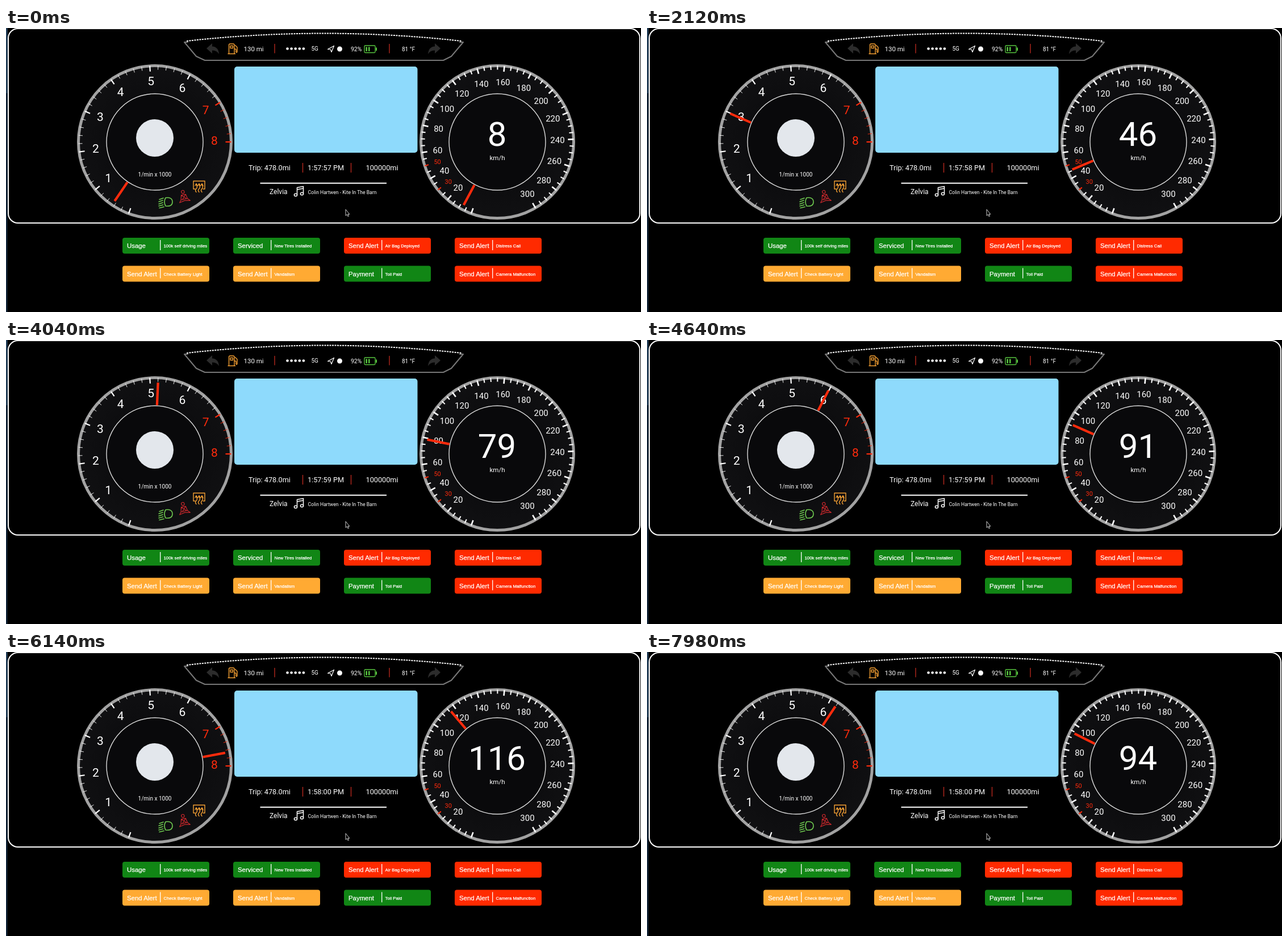
Recreate the animation shown at these times as an HTML page. Size 1118x501 px, loop 8000 ms.

```html
<!DOCTYPE html>
<html lang="en">
<head>
<meta charset="utf-8">
<title>Dashboard</title>
<style>
html, body { margin: 0; width: 100%; height: 100%; overflow: hidden; background: #000; }
svg { display: block; width: 1118px; height: 501px; font-family: Roboto, Arial, sans-serif; }
.line { fill: none; stroke-linecap: round; stroke-linejoin: round; }
.button { font-family: "Liberation Sans", Arial, sans-serif; }
.button text { stroke: #fff; stroke-width: .25px; }
</style>
</head>
<body>
<svg id="stage" viewBox="0 0 1118 501">
  <defs>
    <radialGradient id="face">
      <stop offset="0" stop-color="#08080a"/>
      <stop offset="1" stop-color="#101012"/>
    </radialGradient>
  </defs>
  <rect width="2.5" height="501" fill="#14263a"/>
  <rect width="2.5" height="115" fill="#26425c"/>
  <rect x="4" y="1" width="1112" height="343" rx="17" fill="#000" stroke="#fff" stroke-width="2"/>

  <!-- status bar -->
  <path class="line" d="M320 25H314L335 50 350 57H770L784 50 805 25H799" stroke="#777" stroke-width="2"/>
  <path d="M318 23Q560-4 802 23" fill="none" stroke="#fff" stroke-width="2" stroke-dasharray="3 1.5"/>
  <path id="turn" d="M353 36 363 27V32.5Q374 33 375 46 371 39 363 39.5V45Z" fill="#2c2c2c"/>
  <use href="#turn" transform="matrix(-1 0 0 1 1118 0)"/>
  <path class="line" d="M392.5 45.5V30Q392.5 28 394.500 28H400Q402 28 402 30V45.5M391 45.5H403.5M395 31.5H399.5V35.5H395ZM402 37H403.5Q405 37 405 39V42.5Q406.5 44 407 42V34L403.5 30.5" stroke="#f5a033" stroke-width="1.4"/>
  <path class="line" d="M566.5 37.5 577.5 31.5 573 42.5 571.5 38Z" stroke="#fff" stroke-width="1.2"/>
  <circle cx="587.5" cy="37" r="4.5" fill="#fff"/>
  <g fill="#58c840">
    <rect x="631" y="31" width="19" height="12.5" rx="1.5" fill="none" stroke="#58c840" stroke-width="1.3"/>
    <path d="M651 34.5H653V40H651ZM633.5 33.5H636V41H633.5ZM638 33.5H640.5V41H638Z"/>
  </g>

  <!-- centre -->
  <rect x="402" y="68" width="322.5" height="152" rx="5" fill="#8edafc"/>
  <path d="M447.5 273.7H670" stroke="#fff" stroke-width="2"/>
  <g class="line" stroke="#fff" stroke-width="1.5">
    <path d="M512.5 294V281.5L523.5 279.5V292M512.5 285 523.5 283"/>
    <ellipse cx="510" cy="294.5" rx="2.6" ry="2.2"/>
    <ellipse cx="521" cy="292.5" rx="2.6" ry="2.2"/>
  </g>

  <g id="parts"></g>

  <!-- warning lights -->
  <path class="line" d="M281 299.5Q293 298 293 307 293 315.5 281 314 277 307 281 299.5ZM270 302.5 277 300M269 306.5 276 304M269 310.5 276 308M269 314 276.5 312M270 317.5 278 315.5" stroke="#6fcb50" stroke-width="1.6"/>
  <g class="line" stroke="#c9282c" stroke-width="1.2" transform="rotate(-12 313 297)">
    <circle cx="313" cy="289" r="2.7"/>
    <path d="M309 294H317L318.500 302H307ZM309 294 317 302M317 294 309 302.5M307 302 303.500 306.5 313 304.500 322.5 306.500 318.500 302"/>
  </g>
  <g class="line" stroke="#f5a033" stroke-width="1.4">
    <path d="M333 284H330V270H350V284H347"/>
    <path id="heat" d="M335 289.5Q332 286.5 335 283.5T335 276.5M333 278 335 274.5 337 278"/>
    <use href="#heat" x="5"/>
    <use href="#heat" x="10"/>
  </g>

  <circle cx="262" cy="194" r="33" fill="#e3e7ec"/>
  <path d="M598 320V331L600.3 329 602 332.5 603.6 331.7 602 328.5H604.8Z" fill="#000" stroke="#ddd" stroke-width=".9"/>
</svg>
<script>
const RED = '#ff2b0c', NS = 'http://www.w3.org/2000/svg';
const parts = document.getElementById('parts');

function add(tag, attrs, parent = parts) {
  const el = document.createElementNS(NS, tag);
  for (const k in attrs) el.setAttribute(k, attrs[k]);
  return parent.appendChild(el);
}

// y is the middle of the capital letters
function text(x, y, str, size, anchor = 'start', fill = '#fff', parent = parts) {
  const el = add('text', {x, y: y + size * .356, 'font-size': size, 'text-anchor': anchor, fill}, parent);
  el.textContent = str;
  return el;
}

function line(x1, y1, x2, y2, stroke, width) {
  return add('line', {x1, y1, x2, y2, stroke, 'stroke-width': width});
}

// angles run clockwise from straight down
function polar(cx, r, deg) {
  const a = deg * Math.PI / 180;
  return [cx - r * Math.sin(a), 201 + r * Math.cos(a)];
}

function tick(cx, deg, length, width, color) {
  line(...polar(cx, 134.5, deg), ...polar(cx, 134.5 - length, deg), color, width);
}

function dialFace(cx) {
  add('circle', {cx, cy: 201, r: 134.5, fill: 'url(#face)', stroke: '#a2a2a2', 'stroke-width': 5});
  add('circle', {cx, cy: 201, r: 85, fill: '#09090b', stroke: '#ddd', 'stroke-width': 1.4});
}

function needle(cx) {
  return line(cx, 287, cx, 327, RED, 4.2);
}

const REV = 262, SPEED = 865;
const revAngle = n => 20 + 31.25 * n;
const speedAngle = v => 20 + v * 31 / 30;

dialFace(REV);
for (let i = 0; i <= 40; i++) {
  const major = i % 5 === 0;
  tick(REV, revAngle(i / 5), major ? 10 : 7, major ? 2.2 : .9, i >= 35 ? RED : '#fff');
}
for (let n = 1; n <= 8; n++) {
  const [x, y] = polar(REV, 105, revAngle(n));
  text(x, y - 2.5, n, 21, 'middle', n > 6 ? RED : '#fff');
}
text(REV, 258, '1/min x 1000', 10, 'middle');

dialFace(SPEED);
for (let v = 0; v <= 300; v += 5) {
  const major = v % 20 === 0, limit = v === 30 || v === 50;
  tick(SPEED, speedAngle(v), major ? 10 : 7, major ? 2.6 : 2, limit ? RED : '#fff');
  if (!limit && (!major || !v)) continue;
  const [x, y] = polar(SPEED, limit ? 111 : 106, speedAngle(v));
  text(x, y, v, limit ? 11 : 15, 'middle', limit ? RED : '#fff');
}
text(SPEED, 229, 'km/h', 11.5, 'middle');
const speedText = text(SPEED - .5, 187, '', 60, 'middle');
const revNeedle = needle(REV), speedNeedle = needle(SPEED);

text(418.5, 37, '130 mi', 11.5);
text(537.5, 36.5, '5G', 10);
text(607, 37, '92%', 10.4);
text(697, 37, '81 °F', 10);
for (let i = 0; i < 5; i++) add('circle', {cx: 495.5 + 7.1 * i, cy: 36.5, r: 2.3, fill: '#fff'});
for (const x of [473, 675]) line(x, 28, x, 44.5, '#c02a20', 1.3);
for (const x of [522.5, 607.5]) line(x, 238, x, 255, '#c02a20', 1.3);

text(427, 246, 'Trip: 478.0mi', 12.7);
const clock = text(531, 246, '', 12.7);
text(633.5, 246, '100000mi', 12.7);
text(464, 289, 'Zelvia', 12);
text(531.5, 290, 'Colin Hartwen - Kite In The Barn', 8.6);

const GREEN = '#118615', ALERT = '#ff2a00', AMBER = '#ffaa33';
[
  ['Usage', '100k self driving miles', GREEN],
  ['Serviced', 'New Tires Installed', GREEN],
  ['Send Alert', 'Air Bag Deployed', ALERT],
  ['Send Alert', 'Distress Call', ALERT],
  ['Send Alert', 'Check Battery Light', AMBER],
  ['Send Alert', 'Vandalism', AMBER],
  ['Payment', 'Toll Paid', GREEN],
  ['Send Alert', 'Camera Malfunction', ALERT]
].forEach(([title, detail, fill], i) => {
  const x = 205 + 195 * (i % 4), y = 370 + 49.5 * (i >> 2);
  const g = add('g', {class: 'button'});
  add('rect', {x, y, width: 153, height: 28, rx: 4, fill}, g);
  text(x + 8, y + 14.3, title, 11.4, 'start', '#fff', g);
  text(x + 72.5, y + 14.3, detail, 7.8, 'start', '#fff', g);
  line(x + 66.7, y + 4, x + 66.7, y + 22, '#fff', 1.3);
});

// speed by step, linear between the points
const KEYS = [[0, 7.75], [23, 26.2], [46, 45.8], [86, 79], [112, 100.9], [137.5, 121], [151, 111], [172, 93]];

function speedAt(n) {
  const i = KEYS.findIndex(k => k[0] > n);
  const [n0, v0] = KEYS[i - 1], [n1, v1] = KEYS[i];
  return v0 + (v1 - v0) * (n - n0) / (n1 - n0);
}

// three steps every 140 ms, held for 20, 100 and 20 ms
function stepAt(t) {
  const r = t % 140;
  return 3 * Math.floor(t / 140) + (r < 20 ? 0 : r < 120 ? 1 : 2);
}

function turn(el, cx, deg) {
  el.setAttribute('transform', `rotate(${deg} ${cx} 201)`);
}

function draw(now) {
  const n = stepAt(now % 8000), v = speedAt(n);
  speedText.textContent = Math.round(v);
  turn(speedNeedle, SPEED, speedAngle(v));
  turn(revNeedle, REV, 18 + v * 250 / 120);
  const s = 57 * 60 + 57 + Math.floor((n + 44) / 54);
  clock.textContent = `1:${Math.floor(s / 60)}:${String(s % 60).padStart(2, '0')} PM`;
  requestAnimationFrame(draw);
}
draw(0);
</script>
</body>
</html>
```
